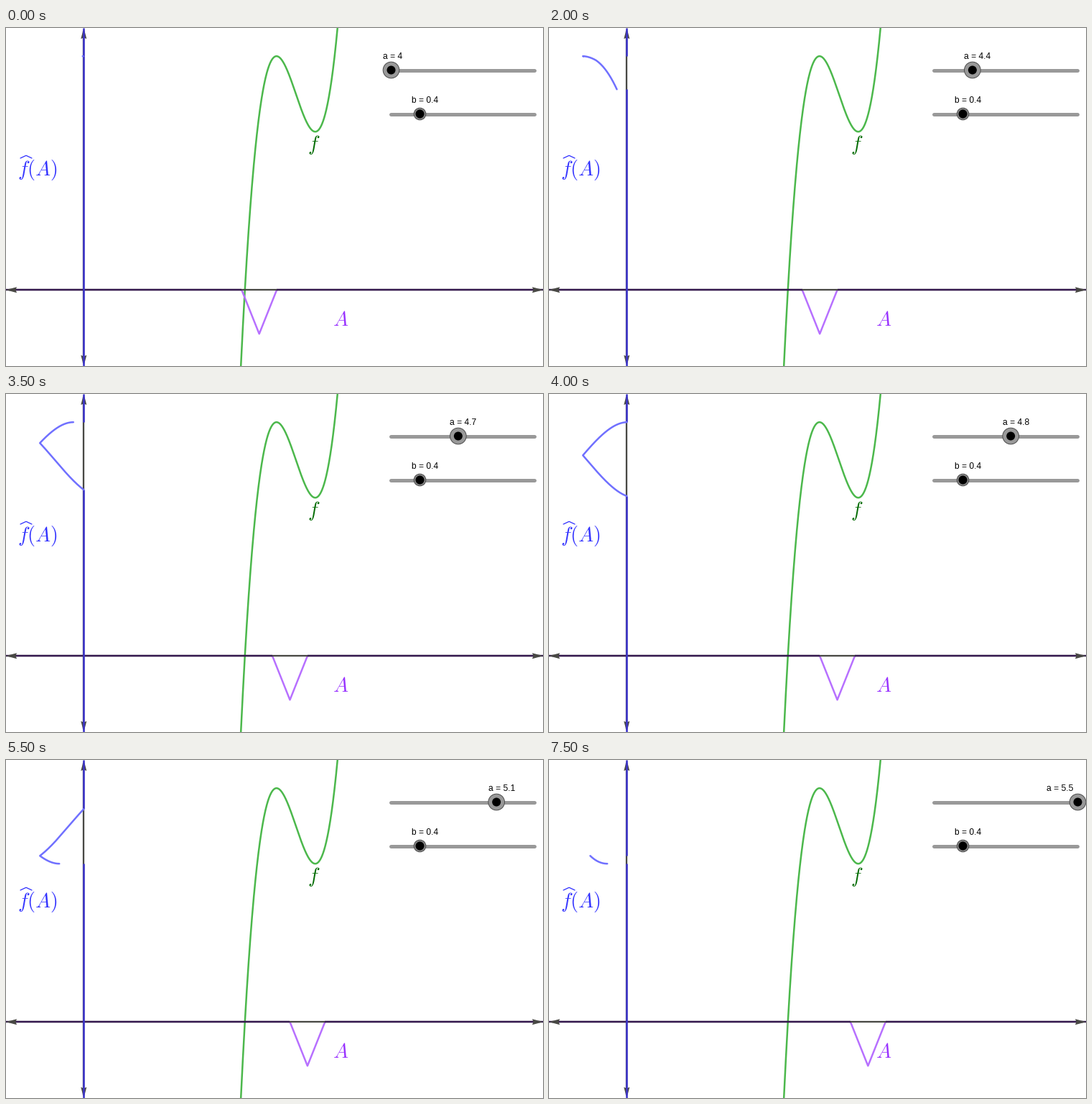
A matplotlib script that plays this animation: 748 px wide and 470 px high, repeating every 8 s.

```python
import numpy as np
import matplotlib
import matplotlib.pyplot as plt
from matplotlib.animation import FuncAnimation
from matplotlib.patches import Circle, Polygon

matplotlib.rcParams["mathtext.fontset"] = "cm"
matplotlib.rcParams["font.family"] = "Liberation Sans"

W, H, DPI = 748, 470, 100
PT = 72 / DPI                      # points per pixel
OX, OY, UNIT = 108.3, 364.2, 61.1  # origin and scale in pixels
XC, YC, HALF = 4.836, 4.46, 0.4413  # cubic: inflection and half gap of extrema
B = 0.4

DARK, GREEN, TEXT_GREEN = "#484844", "#4cb84c", "#006a00"
PURPLE, BLUE = "#b770ff", "#7070ff"
X_AXIS, Y_AXIS = "#35194f", "#3d35cc"

fig = plt.figure(figsize=(W / DPI, H / DPI), dpi=DPI, facecolor="white")
ax = fig.add_axes([0, 0, 1, 1])
ax.set_xlim(0, W)
ax.set_ylim(H, 0)
ax.axis("off")


def px(x):
    return OX + UNIT * np.asarray(x)


def py(y):
    return OY - UNIT * np.asarray(y)


def line(xs, ys, color, width=2.5, z=2, cap="round"):
    return ax.plot(xs, ys, color=color, lw=width * PT, zorder=z,
                   solid_capstyle=cap, solid_joinstyle="round")[0]


def label(x, y, s, size, color="black"):
    return ax.text(x, y, s, fontsize=size * PT, color=color, zorder=9,
                   ha="left", va="baseline")


def arrow(tip, direction):
    tip, d = np.array(tip), np.array(direction)
    side = np.array([-d[1], d[0]])
    pts = [tip, tip - 15 * d + 4 * side, tip - 13.5 * d, tip - 15 * d - 4 * side]
    ax.add_patch(Polygon(pts, fc=DARK, ec="none", zorder=5))


def knob(x, y, radius, fill):
    ring = Circle((x, y), radius, fc=fill, ec="#4d4d4d", lw=PT, zorder=6)
    dot = Circle((x, y), 6, fc="black", ec="none", zorder=7)
    ax.add_patch(ring)
    ax.add_patch(dot)
    return ring, dot


def membership(x, a):
    return np.maximum(0, 1 - np.abs(x - a) / B)


# Axes
line([4, W - 4], [OY, OY], DARK, 2.3, 3, "butt")
line([OX, OX], [4, H - 4], DARK, 2.3, 3, "butt")
for tip, d in [((0, OY), (-1, 0)), ((W, OY), (1, 0)),
               ((OX, 0), (0, -1)), ((OX, H), (0, 1))]:
    arrow(tip, d)
x_zero = [line([], [], X_AXIS, 2.4, 4, "butt") for _ in range(2)]
y_zero = [line([], [], Y_AXIS, 2.6, 6, "butt") for _ in range(2)]

# Cubic
u = np.linspace(-1.4, 1.1, 500)
line(px(XC + u), py(YC + 5 * u**3 - 15 * HALF**2 * u), GREEN)

# The three preimages of each level, ordered right, left, middle
phi = np.linspace(0, np.pi, 1500)
level = YC + 10 * HALF**3 * np.cos(phi)
roots = [XC + 2 * HALF * np.cos((phi + 2 * np.pi * k) / 3) for k in range(3)]

tri = line([], [], PURPLE)
image = line([], [], BLUE, z=7)

label(420, 170, "$f$", 28, TEXT_GREEN)
label(455, 414, "$A$", 28, "#9933ff")
label(16, 205, "$f(A)$", 28, "#3333ff")
line([20, 28, 36], [181, 177.3, 181], "#3333ff", 1.3)

# Sliders
for y in (58.5, 119.5):
    line([536.5, 736.5], [y, y], "#999999", 5, 5)
knob_a = knob(536.5, 58.5, 11.3, "#999999")
knob(576.5, 119.5, 8.3, "#858585")
label_a = label(525, 43, "", 12)
label(565, 104, "b = 0.4", 12)


def update(i):
    a = round(4 + 0.1 * i, 1)
    left, right = px(a - B), px(a + B)
    tri.set_data(px([a - B, a, a + B]), py([0, -1, 0]))
    x_zero[0].set_data([0, left], [OY, OY])
    x_zero[1].set_data([right, W], [OY, OY])

    mu = [membership(r, a) for r in roots]
    live = mu[2] > 0
    ys = py(level[live])
    image.set_data(px(-np.max(mu, axis=0)[live]), ys)
    top, bottom = (ys[0], ys[-1]) if len(ys) else (H / 2, H / 2)
    y_zero[0].set_data([OX, OX], [0, top])
    y_zero[1].set_data([OX, OX], [bottom, H])

    x = 536.5 + (a - 4) / 1.5 * 200
    for part in knob_a:
        part.center = (x, 58.5)
    label_a.set_text(f"a = {a:g}")
    label_a.set_x(min(x - 11.5, 693))
    return []


anim = FuncAnimation(fig, update, frames=16, interval=500,
                     repeat=True, repeat_delay=0, blit=False)
plt.show()
```
